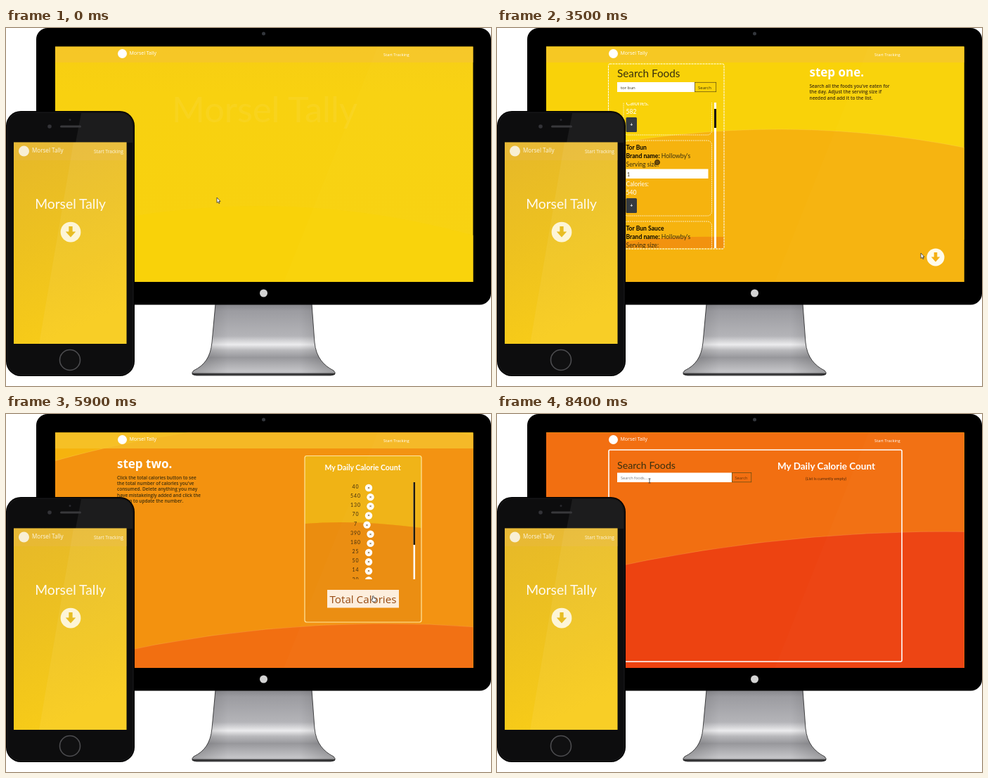
Animation, 690 px wide and 509 px high, one loop 8.5 s. Source, as an HTML page:

```html
<!DOCTYPE html>
<html lang="en">
<head>
<meta charset="utf-8">
<title>Morsel Tally</title>
<style>
html, body { margin: 0; width: 100%; height: 100%; overflow: hidden; background: #fff; }
svg { display: block; width: 690px; height: 509px; }
text { font-family: Lato, sans-serif; }
.ui { font-family: "Open Sans", sans-serif; }
.w { fill: #fff; }
.d { fill: #38300f; }
.b { font-weight: 700; }
.mid { text-anchor: middle; }
.step { font: 700 17px "Open Sans", sans-serif; fill: #fff; }
.note { font: 600 6.5px "Open Sans", sans-serif; fill: #40300c; }
.item text { font-size: 8.6px; }
.box { fill: none; stroke: #fff; }
.button { fill: none; stroke: #5b4a12; stroke-width: .7; }
</style>
</head>
<body>
<svg viewBox="0 0 690 509">
  <defs>
    <clipPath id="screenClip"><rect x="70" y="26.500" width="594.500" height="334.500"/></clipPath>
    <clipPath id="foodClip"><rect x="160" y="106" width="162" height="207"/></clipPath>
    <clipPath id="countClip"><rect x="427" y="94" width="162" height="141"/></clipPath>
    <linearGradient id="home" x2="0" y2="1">
      <stop stop-color="#f7cd14"/><stop offset=".1" stop-color="#f8d110"/><stop offset="1" stop-color="#f8d20d"/>
    </linearGradient>
    <linearGradient id="metal" x2="0" y2="1">
      <stop stop-color="#85858a"/><stop offset=".1" stop-color="#9c9ca1"/><stop offset=".45" stop-color="#b4b4b8"/>
      <stop offset=".57" stop-color="#ececee"/><stop offset=".65" stop-color="#b8b8bb"/>
      <stop offset=".75" stop-color="#98989c"/><stop offset=".95" stop-color="#c6c6c9"/><stop offset="1" stop-color="#55555a"/>
    </linearGradient>
    <linearGradient id="sheen">
      <stop stop-opacity=".2"/><stop offset=".25" stop-opacity="0"/>
      <stop offset=".75" stop-opacity="0"/><stop offset="1" stop-opacity=".2"/>
    </linearGradient>
    <linearGradient id="mobile" x2=".25" y2="1">
      <stop stop-color="#e6b82a"/><stop offset=".5" stop-color="#edc120"/><stop offset="1" stop-color="#f7cb18"/>
    </linearGradient>
    <path id="stand" d="M298 392H435L439 447C441 468 452 480 466 487Q472 493 462 494H271Q261 493 267 487C282 480 291 468 293 447Z"/>
    <g id="down">
      <circle r="12.5" fill="#fffbea"/>
      <path d="M-2.3-7H2.3V-.5H6.3L0 6.5L-6.3-.5H-2.3Z"/>
    </g>
  </defs>

  <!-- monitor -->
  <use href="#stand" fill="url(#metal)"/>
  <use href="#stand" fill="url(#sheen)" stroke="#1c1c1e" stroke-width=".8"/>
  <path d="M265 492H468" stroke="#222" stroke-width="1.500"/>
  <rect x="43" width="647" height="393.500" rx="16"/>
  <circle cx="366.500" cy="8" r="2.500" fill="#33363c"/>
  <circle cx="366.500" cy="377" r="5.500" fill="#d3d3d3"/>

  <g clip-path="url(#screenClip)">
    <g id="page">
      <rect x="60" y="20" width="620" height="700" fill="url(#home)"/>
      <g id="waves"></g>

      <g id="title"><text x="368" y="133.500" class="w mid" font-size="50.500">Morsel Tally</text></g>
      <g id="tagline"><text x="367" y="161" class="w mid" font-size="12.500">Tracking Calories Made Easy.</text></g>
      <g id="arrowHome"><use href="#down" x="367.500" y="191" fill="#f8cf10"/></g>

      <g transform="translate(0 419)">
        <path d="M160 306Q240 295 323 297V313H160Z" fill="#f2920f"/>
        <rect class="box" x="158.500" y="51" width="164.500" height="263" rx="2" stroke-dasharray="3 1"/>
        <text x="171" y="70" class="d" font-size="15.300">Search Foods</text>
        <rect x="171" y="77" width="110" height="14" fill="#fff"/>
        <rect class="button" x="281.400" y="77.300" width="30.300" height="13.400"/>
        <text x="286" y="86.500" class="ui d" font-size="6">Search</text>
        <text id="query" x="176" y="86.500" class="ui d" font-size="6"></text>
        <g id="results" clip-path="url(#foodClip)">
          <g id="foods"></g>
          <path d="M310.500 106V313" stroke="#fff" stroke-width="3"/>
          <path id="foodThumb" d="M310.500 106V133" stroke="#111" stroke-width="3"/>
        </g>
        <g id="stepOne"></g>
        <g id="arrowOne"><use href="#down" x="624" y="326" fill="#f5b012"/></g>
      </g>

      <g transform="translate(0 838)">
        <rect x="425" y="59" width="166" height="237" rx="3" fill="#ef930f"/>
        <path d="M425 156Q500 150 591 162V59H425Z" fill="#f0b315"/>
        <path d="M425 156Q500 150 591 162V296H425Z" fill="#e9890f" opacity=".55"/>
        <rect class="box" x="425" y="59.500" width="166" height="236.500" rx="3" style="stroke:#ffe6a0" stroke-width="1.200"/>
        <text x="507.500" y="80" class="w b mid" font-size="10.500">My Daily Calorie Count</text>
        <g id="counts" clip-path="url(#countClip)"></g>
        <path d="M580.800 97V235" stroke="#fff" stroke-width="2.500"/>
        <path d="M580.800 97V186" stroke="#1d160a" stroke-width="2.500"/>
        <rect x="457" y="250" width="102" height="25.500" fill="#fdeedd"/>
        <text x="508" y="269" class="ui mid" font-size="15.200" fill="#96480f">Total Calories</text>
        <g id="stepTwo"></g>
      </g>

      <g transform="translate(0 1257)">
        <g id="tracker">
          <rect class="box" x="159" y="51" width="417" height="301" rx="2" stroke-width="1.600"/>
          <text x="171" y="78" class="d" font-size="14.200">Search Foods</text>
          <rect x="171" y="83.500" width="163" height="13.500" fill="#fff"/>
          <rect class="button" x="334.300" y="83.500" width="27.500" height="13.300"/>
          <text x="176" y="92.500" class="ui" font-size="5.600" fill="#777">Search foods...</text>
          <text x="338.500" y="92.500" class="ui" font-size="5.700" fill="#6d3608">Search</text>
          <text x="468.500" y="79" class="w b mid" font-size="13.500">My Daily Calorie Count</text>
          <text x="468" y="93.500" class="mid" font-size="5.700" fill="#52290a">(List is currently empty)</text>
        </g>
      </g>
    </g>

    <rect id="band" x="60" y="20" width="620" height="29" fill="#f6c52d"/>
    <circle cx="165.500" cy="36.500" r="6.500" class="w"/>
    <text x="175.500" y="38" class="ui w" font-size="7">Morsel Tally</text>
    <text x="537" y="39.500" class="ui w" font-size="5.800">Start Tracking</text>
    <path d="M531 20H680V361H395Z" fill="#fff" opacity=".01"/>
    <circle id="mark" cx="228" cy="191" r="3.500" fill="#6d4d0c" stroke="#3d2c08"/>

    <g id="cursor">
      <path id="pointer" d="M-2-4V3.500L-.3 2L.9 4.500L2 4L.9 1.500H3Z" fill="#fff" stroke="#333" stroke-width=".8"/>
      <path id="hand" d="M-1.500-4Q-.5-5 .2-4V-1.500L3-.8Q4 0 3.300 2L2.500 4H-1.200L-3.500 .8Q-3-.5-1.500 .6Z" fill="#fff" stroke="#444" stroke-width=".9"/>
      <path id="beam" d="M-1.500-3H1.500M0-3V3M-1.500 3H1.500" fill="none" stroke="#333" stroke-width=".8"/>
    </g>
  </g>

  <!-- phone -->
  <rect y="118" width="183" height="377" rx="21"/>
  <rect x="2" y="120" width="179" height="373" rx="19" fill="#0d0d0e" stroke="#1c1c1e"/>
  <path d="M107 121H161Q180 121 180 141V163H99Z" fill="#1c1c1d"/>
  <rect x="11" y="162.500" width="160.500" height="286.500" fill="url(#mobile)"/>
  <rect x="11" y="162.500" width="160.500" height="25.500" fill="#e9b84a" opacity=".35"/>
  <path d="M96 162.500H171.500V449H47Z" fill="#fff" opacity=".06"/>
  <circle cx="62" cy="140" r="2.800" fill="#333338"/>
  <circle cx="91" cy="130.500" r="1.500" fill="#29292d"/>
  <rect x="77" y="138.500" width="30" height="3" rx="1.500" fill="#38383b"/>
  <circle cx="91" cy="472" r="14.500" fill="#101011" stroke="#4c4c4f" stroke-width="1.600"/>
  <circle cx="25.500" cy="175" r="7.500" fill="#f8efd5"/>
  <text x="37" y="177" class="ui" font-size="8.100" fill="#fcf6e4">Morsel Tally</text>
  <text x="125" y="178" class="ui" font-size="6.600" fill="#fcf6e4">Start Tracking</text>
  <text x="91.500" y="256.500" class="mid" font-size="19.300" fill="#fffaf0">Morsel Tally</text>
  <use href="#down" transform="translate(92 290) scale(1.150)" fill="#e8bd22" opacity=".9"/>
</svg>

<script>
const LOOP = 8500, STEP = 100, SECTION = 419;
const el = id => document.getElementById(id);

// Parabolic hill top: peak at (cx, peak), filled downwards.
function wave(cx, peak, bend, fill, edge = .3) {
  const y = (a, b) => peak + bend * (a - cx) * (b - cx);
  const [l, r] = [60, 680];
  return `<path d="M${l} ${y(l, l)}Q${(l + r) / 2} ${y(l, r)} ${r} ${y(r, r)}V1800H${l}Z"
    fill="${fill}" stroke="#ffe080" stroke-opacity="${edge}" stroke-width=".7"/>`;
}
el('waves').innerHTML =
  wave(360, 253, .00045, '#f9d209', 0) +
  wave(400, SECTION + 144, .00037, '#f6b30e') +
  wave(450, SECTION + 432, .00037, '#f3920f') +
  wave(540, 2 * SECTION + 298, .00028, '#f26f11') +
  wave(640, 3 * SECTION + 167, .000225, '#ed4311');

function food(name, calories, i) {
  return `<g class="item" transform="translate(0 ${113 + i * 115})">
    <rect class="box" x="180" width="125.500" height="107" rx="6" stroke-width=".7" stroke-dasharray="2 1"/>
    <text x="183.500" y="13" class="b">${name}</text>
    <text x="183.500" y="25" class="d"><tspan class="b" fill="#000">Brand name:</tspan> Hollowby's</text>
    <text x="183.500" y="37" class="d">Serving size:</text>
    <rect x="183.500" y="40.500" width="117" height="13.500" fill="#fff"/>
    <text x="185" y="50.500" class="d" style="font-size:7px">1</text>
    <text x="183.500" y="65" class="w">Calories:</text>
    <text x="183.500" y="77" class="w">${calories}</text>
    <rect x="183.500" y="82" width="15.500" height="21" rx="1.500" fill="#343a40"/>
    <text x="191.200" y="95" class="w b mid" style="font-size:7px">+</text></g>`;
}
el('foods').innerHTML = [['Tor Bun Deluxe', 582], ['Tor Bun', 540], ['Tor Bun Sauce', 70], ['Tor Bun Meal', 1080]]
  .map(([name, calories], i) => food(name, calories, i)).join('');

el('counts').innerHTML = [40, 540, 130, 70, 7, 390, 180, 25, 50, 14, 20].map((n, i) => {
  const y = 104.5 + i * 13.150, x = 511 + 2.500 * String(n).length;
  return `<text x="497.500" y="${y + 1.5}" class="mid" font-size="7" letter-spacing="1" fill="#3d290b">${n}</text>
    <circle cx="${x}" cy="${y + .5}" r="5.200" class="w"/>
    <text x="${x}" y="${y + 2.5}" class="b mid" font-size="6" fill="#6b4a10">×</text>`;
}).join('');

function step(id, x, y, title, lines) {
  el(id).innerHTML = `<text class="step" x="${x}" y="${y}">${title}</text>` +
    lines.map((line, i) => `<text class="note" x="${x}" y="${y + 16 + i * 8.4}">${line}</text>`).join('');
}
step('stepOne', 444.5, 69, 'step one.', ['Search all the foods you\'ve eaten for',
  'the day. Adjust the serving size if', 'needed and add it to the list.']);
step('stepTwo', 158, 76.5, 'step two.', ['Click the total calories button to see',
  'the total number of calories you\'ve', 'consumed. Delete anything you may',
  'have mistakeingly added and click the', 'button to update the number.']);

const clamp = p => Math.min(1, Math.max(0, p));
const swing = p => .5 - Math.cos(Math.PI * clamp(p)) / 2;

// Linear interpolation over [time, value] keys.
function at(keys, t) {
  const i = keys.findIndex(k => k[0] > t);
  if (i < 0) return keys[keys.length - 1][1];
  if (i === 0) return keys[0][1];
  const [[t0, a], [t1, b]] = [keys[i - 1], keys[i]];
  return a + (b - a) * (t - t0) / (t1 - t0);
}

const fades = {
  title: [[0, .06], [600, 1]],
  tagline: [[500, 0], [1100, 1]],
  arrowHome: [[1000, 0], [1500, 1]],
  results: [[3000, 0], [3100, 1]],
  stepOne: [[2400, 0], [2800, 1]],
  arrowOne: [[2700, 0], [3100, 1], [4200, 1], [4600, .3]],
  stepTwo: [[4650, 0], [5000, 1]],
  tracker: [[6650, 0], [6700, .12], [7300, 1]],
  band: [[6300, .75], [6600, 0]]
};
const path = [[0, 302, 245], [1400, 340, 222], [1900, 370, 191], [2500, 370, 191], [2750, 230, 84],
  [3050, 230, 84], [3300, 228, 191], [3500, 605, 324], [3900, 624, 332], [4700, 624, 332],
  [5600, 523, 263], [6000, 523, 263], [6250, 624, 329], [7250, 400, 200], [8200, 217, 95]];
const pathX = path.map(([t, x]) => [t, x]), pathY = path.map(([t, , y]) => [t, y]);
const within = (t, ...spans) => spans.some(([a, b]) => t >= a && t < b);
const show = (id, on) => el(id).setAttribute('visibility', on ? 'visible' : 'hidden');
const move = (id, x, y) => el(id).setAttribute('transform', `translate(${x} ${y})`);

function draw(t) {
  const scroll = [2088, 4228, 6320].reduce((sum, start) => sum + SECTION * swing((t - start) / 400), 0);
  move('page', 0, -scroll);
  for (const id in fades) el(id).setAttribute('opacity', at(fades[id], t));

  const listScroll = at([[3100, 0], [3500, 68], [3900, 145]], t);
  move('foods', 0, -listScroll);
  move('foodThumb', 0, listScroll * .132);
  move('tracker', 0, at([[6700, -63], [7300, 0]], t));

  const typed = Math.round(7 * clamp((t - 2700) / 300));
  el('query').textContent = typed ? 'tor bun'.slice(0, typed) : 'Search foods...';

  move('cursor', at(pathX, t), at(pathY, t));
  const visible = !within(t, [6400, 7300]);
  const hand = within(t, [1700, 2600], [3900, 4800], [5500, 6100]);
  const beam = within(t, [2700, 3100], [8100, LOOP]);
  show('hand', visible && hand);
  show('beam', visible && beam);
  show('pointer', visible && !hand && !beam);
  show('mark', within(t, [3300, 3700]));
}

function tick() {
  draw(Math.floor(performance.now() / STEP) * STEP % LOOP);
  requestAnimationFrame(tick);
}
tick();
</script>
</body>
</html>
```
